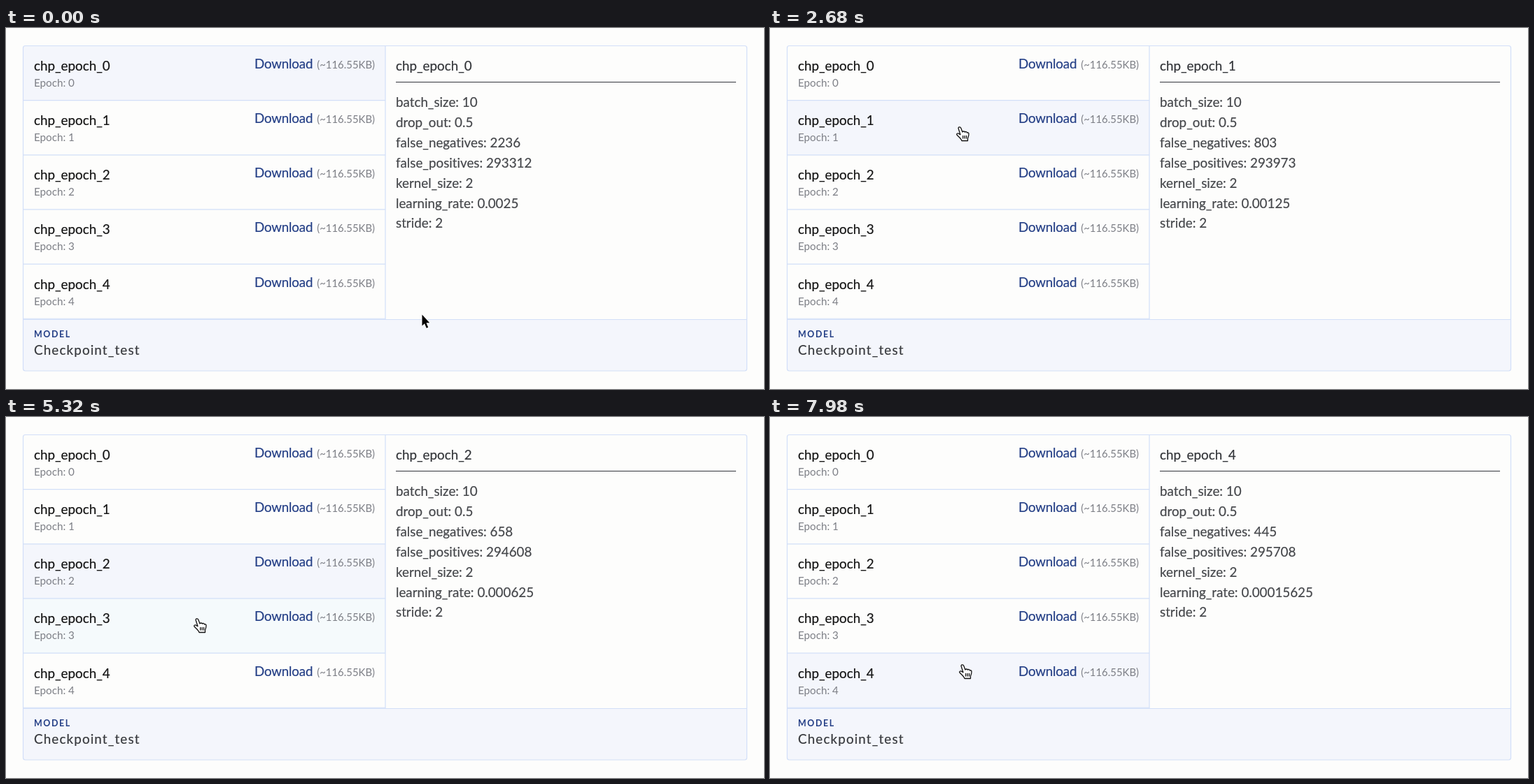
Recreate the animation shown at these times as an HTML page. Size 1083 px wide and 517 px high, loop 8000 ms.

```html
<!DOCTYPE html>
<html lang="en">
<head>
<meta charset="utf-8">
<title>Checkpoints</title>
<style>
  html, body { margin: 0; width: 100%; height: 100%; overflow: hidden; background: #fdfdfc; }
  svg { display: block; width: 100%; height: 100%; }
  text {
    font: 18.8px Lato, "Open Sans", sans-serif;
    font-variant-ligatures: none;
    white-space: pre;
    stroke-width: .2;
  }
  .name { fill: #151515; stroke: #151515; }
  .small { font-size: 15.2px; fill: #7d7f86; }
  .size { font-size: 14.9px; fill: #7d7f86; text-anchor: end; }
  .link { fill: #243f86; stroke: #243f86; letter-spacing: -.2px; }
  .title { fill: #333539; stroke: #333539; }
  .detail { fill: #45474b; stroke: #45474b; }
  .label { font-size: 12.4px; font-weight: 700; letter-spacing: 1.6px; fill: #243f86; }
  .model { letter-spacing: 1.15px; fill: #37393d; stroke: #37393d; }
  .line { fill: none; stroke: #d2dff8; stroke-width: 1.2; }
</style>
</head>
<body>
<svg id="stage" viewBox="0 0 1083 517"></svg>
<script>
const LOOP = 8000;
const ROW_TOP = 26, ROW_STEP = 78.15, ROWS = 5;
const SELECTED = '#f4f6fc', HOVERED = '#f5fafc';

// false negatives, false positives, learning rate
const runs = [
  ['2236', '293312', '0.0025'],
  ['803', '293973', '0.00125'],
  ['658', '294608', '0.000625'],
  ['559', '294627', '0.0003125'],
  ['445', '295708', '0.00015625']
];
const selectTimes = [0, 2540, 4260, 5700, 7340];
const hoverTimes = [Infinity, 2380, 3780, 5140, 6940];
const ringTimes = [2140, 3960, 5440, 7080];
const RING_TIME = 250;

// time, x, y of the pointer's hot spot
const path = [
  [0, 594, 410], [1000, 594, 410], [2120, 271, 141], [2850, 271, 141],
  [3620, 273, 194], [3740, 273, 203], [4640, 273, 203], [5240, 273, 288],
  [6180, 273, 288], [6840, 275, 353], [6900, 275, 354], [LOOP, 275, 354]
];

const stage = document.getElementById('stage');

function add(tag, attrs, parent = stage) {
  const node = document.createElementNS('http://www.w3.org/2000/svg', tag);
  for (const key in attrs) node.setAttribute(key, attrs[key]);
  return parent.appendChild(node);
}

function write(x, y, cls, content = '') {
  const node = add('text', { x, y, class: cls });
  node.textContent = content;
  return node;
}

const line = d => add('path', { d, class: 'line' });

const rows = Array.from({ length: ROWS }, (_, i) => {
  const y = ROW_TOP + i * ROW_STEP;
  const box = { x: 25, y, width: 517, height: ROW_STEP };
  const hover = add('rect', { ...box, fill: HOVERED });
  const active = add('rect', { ...box, fill: SELECTED });
  write(40, y + 35, 'name', `chp_epoch_${i}`);
  write(40, y + 58, 'small', `Epoch: ${i}`);
  write(355, y + 32, 'link', 'Download');
  write(527, y + 32, 'size', '(~116.55KB)');
  return { hover, active };
});

add('rect', { x: 25, y: 418, width: 1033, height: 72.5, fill: SELECTED });
for (let i = 1; i <= ROWS; i++) line(`M25 ${ROW_TOP - .5 + i * ROW_STEP}H542`);
line('M542 26V417M25 417.5H1058');
add('rect', { x: 24.5, y: 25.5, width: 1034, height: 465.5, rx: 3, class: 'line' });
write(40, 443, 'label', 'MODEL');
write(40, 467.5, 'model', 'Checkpoint_test');

const title = write(557, 61, 'title');
add('path', { d: 'M557 77.5H1043', stroke: '#33353d', 'stroke-width': 1.1 });
const details = Array.from({ length: 7 }, (_, i) => write(557, 113 + i * 28.9, 'detail'));

const ring = add('circle', { fill: 'none', stroke: '#111', 'stroke-width': 1.9 });
const pointer = add('g', { 'stroke-linejoin': 'round', 'stroke-linecap': 'round' });
const arrow = add('path', {
  d: 'M.5 .5V16.5L4 13.2L6.7 19.8L9.2 18.7L6.5 12.2H11.2Z',
  fill: '#000', stroke: '#fff', 'stroke-width': 1.5, 'paint-order': 'stroke'
}, pointer);
const hand = add('g', { stroke: '#111', 'stroke-width': 1.3, transform: 'translate(0 1)' }, pointer);
add('path', {
  d: 'M-1.8 2C-2.6 -.2 1 -1 1.9 1.4L4 7C5 5.5 7 5.8 7.5 7.2C8.5 6 10.3 6.5 10.6 8' +
     'C12 7.3 13 8.3 13 9.5C13.2 13 12 14.5 11.5 16V19.5H3C2 16 -2 13.5 -4 11' +
     'C-5 9 -2.5 8 -.5 10L1 10.8Z',
  fill: '#fff'
}, hand);
add('path', { d: 'M4.7 12.5V16M7.2 12.5V16M9.6 12.5V16', fill: 'none' }, hand);

const clamp = v => Math.max(0, Math.min(1, v));
const smooth = v => v * v * (3 - 2 * v);

function pointerAt(t) {
  const next = path.findIndex(p => p[0] > t);
  const [t0, x0, y0] = path[next - 1], [t1, x1, y1] = path[next];
  const k = smooth((t - t0) / (t1 - t0));
  return [x0 + (x1 - x0) * k, y0 + (y1 - y0) * k];
}

let shown = -1;
function showRun(index) {
  if (index === shown) return;
  shown = index;
  const [negatives, positives, rate] = runs[index];
  title.textContent = `chp_epoch_${index}`;
  [
    'batch_size: 10', 'drop_out: 0.5', `false_negatives: ${negatives}`,
    `false_positives: ${positives}`, 'kernel_size: 2', `learning_rate: ${rate}`, 'stride: 2'
  ].forEach((content, i) => { details[i].textContent = content; });
  rows.forEach((row, i) => row.active.setAttribute('opacity', i === index ? 1 : 0));
}

function draw(t) {
  showRun(selectTimes.filter(s => s <= t).length - 1);
  rows.forEach((row, i) => {
    const tint = i > shown ? clamp((t - hoverTimes[i]) / 150) : 0;
    row.hover.setAttribute('opacity', tint);
  });

  const [x, y] = pointerAt(t);
  const overList = x < 542 && y < 417;
  pointer.setAttribute('transform', `translate(${x} ${y})`);
  arrow.setAttribute('visibility', overList ? 'hidden' : 'visible');
  hand.setAttribute('visibility', overList ? 'visible' : 'hidden');

  const click = ringTimes.find(s => t >= s && t < s + RING_TIME);
  ring.setAttribute('visibility', click === undefined ? 'hidden' : 'visible');
  if (click !== undefined) {
    ring.setAttribute('cx', x);
    ring.setAttribute('cy', y);
    ring.setAttribute('r', 12 + 25 * clamp((t - click) / 110));
  }
}

const start = performance.now();
function tick() {
  draw((performance.now() - start) % LOOP);
  requestAnimationFrame(tick);
}
tick();
</script>
</body>
</html>
```
